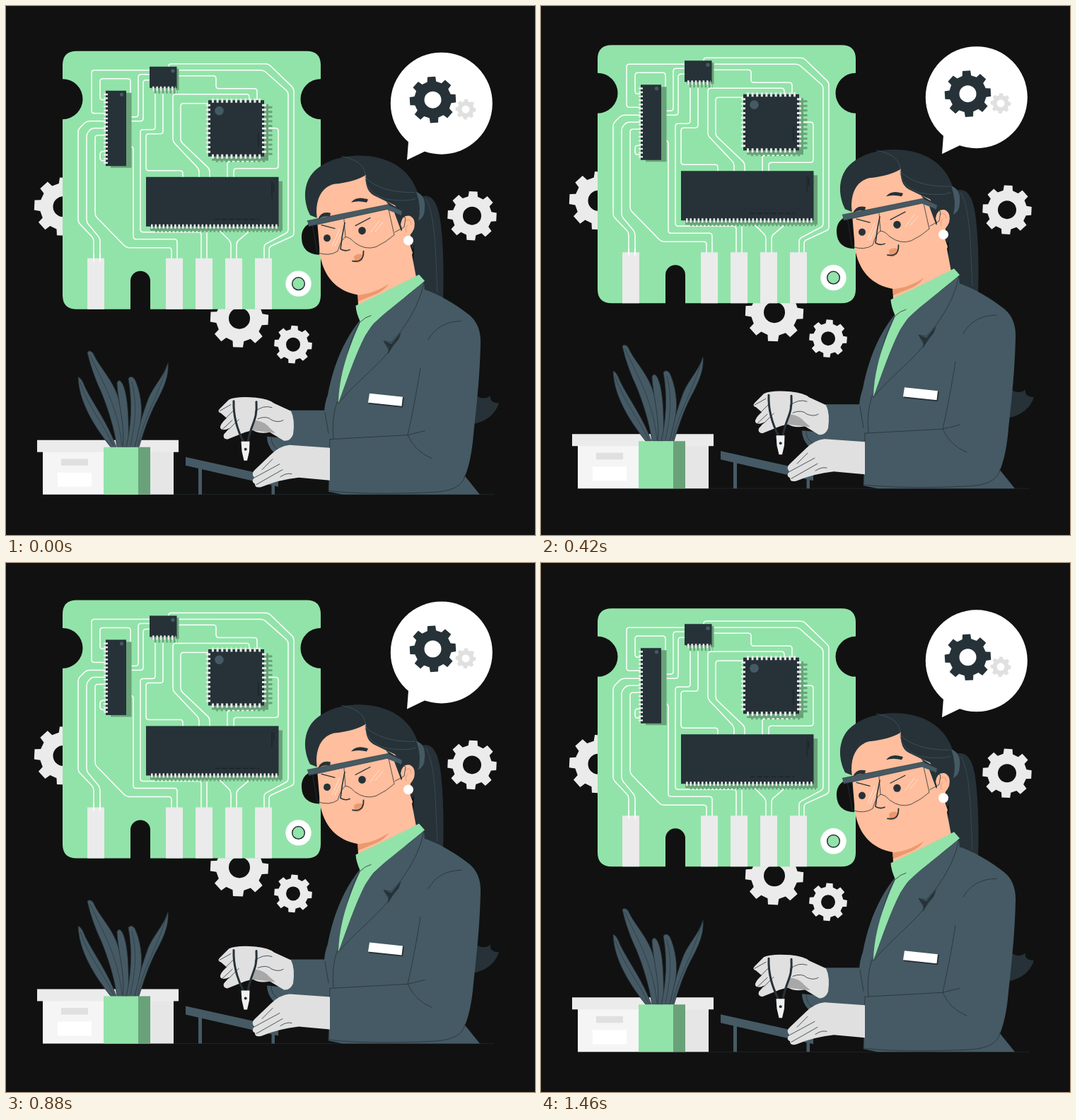
Write an HTML page that moves like this. It is 748 px wide and 748 px high and loops after 1500 ms.

```html
<!DOCTYPE html>
<html lang="en">
<head>
<meta charset="utf-8">
<title>Circuit technician</title>
<style>
  html, body { margin: 0; height: 100%; overflow: hidden; background: #111; }
  svg { display: block; width: 100vw; height: 100vh; }
  .slate { fill: #455a64; }
  .dark { fill: #263238; }
  .green { fill: #92e3a9; }
  .shade { fill: #69a279; }
  .pale { fill: #ebebeb; }
  .grey { fill: #e0e0e0; }
  .skin { fill: #ffbe9d; }
  .blush { fill: #eb996e; }
  .white { fill: #fff; }
  .line { fill: none; stroke: #263238; stroke-linecap: round; stroke-linejoin: round; }
  .trace { fill: none; stroke: #fff; stroke-width: 1.5; }
  .pins { fill: none; stroke: #ebebeb; stroke-width: 6; }
  .pinShade { fill: none; stroke: #69a279; stroke-width: 6; }
</style>
</head>
<body>
<svg viewBox="0 0 748 748">
<g id="scene">
  <path class="line" d="M52 691H690" stroke-width=".6"/>
  <g id="gears"></g>

  <!-- circuit board -->
  <path class="green" d="M100 64H425Q445 64 445 84V103.500A28.500 28.500 0 0 0 445 160.500V409Q445 429 425 429H204V389A14 14 0 0 0 176 389V429H100Q80 429 80 409V160.500A28.500 28.500 0 0 0 80 103.500V84Q80 64 100 64Z"/>
  <g id="traces">
    <polyline points="230,88 230,82 371,82 407,117 407,325 372,341 372,358"/>
    <polyline points="241,91 364,91 399,122 399,320 365,338 365,358"/>
    <polyline points="241,99 297,99 297,117 355,117 355,134"/>
    <polyline points="203,91 121,91 121,152 141,152"/>
    <polyline points="141,133 133,133 133,103 176,103 176,137 169,137"/>
    <polyline points="203,97 187,97 187,157 169,157"/>
    <polyline points="203,105 194,105 194,163 169,163"/>
    <polyline points="211,118 211,175 190,175 190,320 276,320 276,358"/>
    <polyline points="222,118 222,181 198,181 198,233 250,233 250,243"/>
    <polyline points="141,163 114,163 102,175 102,306 124,329 124,362"/>
    <polyline points="141,173 121,173 114,181 114,306 133,329 133,362"/>
    <polyline points="141,183 126,183 126,297 170,342 234,342 234,358"/>
    <polyline points="141,206 133,206 133,219 141,219"/>
    <polyline points="169,199 180,199 180,330 242,330 242,358"/>
    <polyline points="287,138 247,138 247,192 288,231 288,243"/>
    <polyline points="344,134 344,125 236,125 236,192 273,231 273,243"/>
    <polyline points="366,173 385,173 385,230 322,230 322,243"/>
    <polyline points="355,212 355,220 313,220 313,243"/>
    <polyline points="284,312 284,358"/>
    <polyline points="302,318 318,334 318,358"/>
    <polyline points="345,318 326,334 326,358"/>
  </g>
  <path class="pale" d="M115 357h24v72h-24zM226 357h24v72h-24zM268 357h24v72h-24zM310 357h24v72h-24zM352 357h24v72h-24z"/>
  <path class="trace" d="M124 350V362M133 350V362"/>
  <circle class="white" cx="413.500" cy="393" r="18.200"/>
  <circle class="green" cx="413.500" cy="393" r="8.800" stroke="#263238" stroke-width="1.500"/>

  <!-- chips -->
  <path class="shade" d="M204 248H391V318H204zM291 139H371V219H291zM206 89H244.500V119H206zM148 123H177.500V229H148z"/>
  <path class="pinShade" d="M211 317H389" stroke-dasharray="2.600 2.900"/>
  <path class="pinShade" d="M373.500 142V212M297 218H368" stroke-dasharray="3 3.600"/>
  <path class="pinShade" d="M210 121H243" stroke-dasharray="2.500 2.900"/>
  <path class="dark" d="M198 242H385.500V312H198zM286 133.500H365V213H286zM203 86H241.500V116H203zM141 120H170V226.500H141z"/>
  <path class="pins" d="M205 312H384" stroke-dasharray="2.600 2.900"/>
  <path class="pins" d="M291 134H363M291 213H363M286 139V210M365 139V210" stroke-dasharray="3 3.600"/>
  <path class="pins" d="M207 117H240" stroke-dasharray="2.500 2.900"/>
  <path class="pins" d="M141 124V224" stroke-dasharray="2.500 3.200"/>
  <path class="line" d="M376 250V272M378.500 252V262M357 180V200" style="stroke:#111" stroke-width=".6"/>
  <path class="line" d="M296 302H358" style="stroke:#111" stroke-width=".6" stroke-dasharray="6 4"/>
  <g class="slate">
    <circle cx="301.500" cy="148.500" r="6.300"/>
    <circle cx="236" cy="92" r="2.700"/>
    <circle cx="163.500" cy="125.500" r="2.600"/>
  </g>

  <!-- speech bubble -->
  <path class="white" d="M569 192L567 218L594 205Z"/>
  <circle class="white" cx="615.800" cy="138" r="72"/>
  <g id="thought"></g>

  <!-- storage box and plant -->
  <path fill="#f5f5f5" d="M52 630H140V691H52z"/>
  <path fill="#e6e6e6" d="M140 630H237V691H140z"/>
  <path class="pale" d="M44 614H244V631H44z"/>
  <path class="grey" d="M78 640.500H116V650H78z"/>
  <path class="white" d="M73 660H121V680H73z"/>
  <path class="white" d="M178 624L183 614L187 624Z"/>
  <g class="slate" stroke="#263238" stroke-width=".8">
    <path d="M102 525C106 526 109 532 112 540C125 566 145 592 156 624H148C125 595 103 560 102 525Z"/>
    <path d="M229 505C231 526 220 546 211 563C200 585 194 605 188 624H181C187 598 193 578 201 556C209 537 222 526 229 505Z"/>
    <path d="M115 490Q118 486 123 491C132 512 153 530 160 559C167 585 170 606 171 624H157C153 597 144 569 135 547Q122 520 115 490Z"/>
    <path d="M157 533Q160 526 165 535C173 552 174 590 173 624H165C169 595 158 560 157 533Z"/>
    <path d="M173 527Q177 522 182 528C190 545 194 570 190 590Q186 608 182 624H170C177 594 179 560 173 527Z"/>
  </g>
  <path class="line" d="M119 494C136 532 158 565 164 622M105 533C115 565 140 595 152 622M227 511C216 550 196 580 186 622M178 532C187 568 181 597 176 622" stroke-width=".6"/>
  <path class="green" d="M138 624H187V691H138z"/>
  <path class="shade" d="M187 624H204V691H187z"/>

  <!-- work stand -->
  <path class="slate" d="M272 650H277V691H272zM375.500 660H380V691H375.500zM254 638L385 667V680L254 650Z"/>

  <!-- ponytail -->
  <path class="dark" d="M586 270C603 264 612 280 615 310Q620 355 618 418L575 400L578 300Z"/>
  <path class="dark" d="M660 548Q675 560 685 551Q683 561 697 562Q689 585 662 591Z"/>
  <path class="line" d="M594 273C608 300 607 350 610 405" style="stroke:#455a64" stroke-width=".6"/>

  <!-- far arm -->
  <path class="slate" d="M402 572H460V628L400 622L378 631Q369 621 369 609L402 612Z"/>
  <path class="line" d="M375 610Q375 622 385 628" stroke-width=".8"/>
  <path class="grey" d="M315 557Q325 552 353 554Q372 556 379 562L403 573Q409 585 406 606Q402 616 393 615L373 603Q358 606 349 600L338 603L313 613Q306 612 308 606L316 597Q306 602 303 597Q302 592 312 583L304 576Q298 574 302 570Z"/>
  <path d="M353 586Q366 588 373 597L381 604L371 603L346 600Z" fill="#a8a8a8"/>
  <path class="grey" d="M352 574Q367 562 379 567L390 588Q382 591 373 585L358 583Z"/>
  <path class="line" d="M302 573L318 564M309 585L321 573M315 599L329 585M352 574Q363 564 376 568M356 584Q369 579 376 586Q386 590 392 586M305 600L320 586" stroke-width=".8"/>
  <path class="line" d="M322 559Q321 588 336 617M354 560C356 587 346 591 342 617" stroke-width="3"/>
  <path fill="#f0f0f0" d="M332.500 616H344.500L344 630L341 643H336.500L333.500 630Z"/>
  <circle class="dark" cx="338.700" cy="627" r="2"/>

  <!-- jacket -->
  <path class="slate" d="M588 400C612 407 637 423 655 437Q672 451 671 478C670 525 665 570 661 606Q658 643 649 665L670 691H476L456 687L458 612L451 582Q448 570 455 550C463 507 479 470 502 443Z"/>
  <path class="line" d="M458 613L568 607L592 601M586 512C580 550 575 575 568 607Q578 630 602 640M644 446Q612 446 597 472M457 686Q515 692 600 688Q645 687 649 664M500 448C482 479 478 516 470 562M458 613L456 686M468 560Q460 585 463 612M451 575L456 605" stroke-width=".8"/>
  <path class="skin" d="M497 395L571 336L580 384L498 424Z"/>
  <path class="blush" d="M497 408C519 404 539 393 546 383Q541 401 520 409L498 418Z"/>
  <path class="green" d="M584 380L592 389C563 414 530 437 517 453L508 466C493 495 480 535 470 562C471 520 485 483 501 447Q495 434 494.500 424Q537 404 584 380Z"/>
  <path class="slate" d="M591 390L592 404Q582 430 558 461L544 473L555 476L541 490L470 562C488 513 504 467 520 449Q550 424 591 390Z"/>
  <path class="line" d="M591 391Q585 424 558 461L545 476L534 474L542 488C520 515 492 535 470 562M558 463L555 471L542 488M501 447Q508 440 516 438" stroke-width=".8"/>
  <path class="dark" d="M558 462L545 478L534 474L541 484L540 493L548 479L555 471Z"/>
  <path class="dark" d="M515 550L563 554L561 568L513 563Z"/>
  <path class="white" d="M514 548L561 553L559.500 566L512 561Z"/>

  <!-- near glove -->
  <path class="grey" d="M458 625V671L414 667Q386 670 362 680Q352 683 352 676Q346 673 351 667Q346 661 352 656L374 635Q387 622 401 621Z"/>
  <path class="line" d="M350 668L387 648M354 677L391 656M377 641L362 656M388 666Q397 660 404 662" stroke-width=".8"/>

  <!-- head -->
  <path class="dark" d="M430 296C420 277 420 252 434 236C450 219 477 211 504 212C549 214 573 237 582 264Q591 280 584 310L575 345L560 315L440 300Z"/>
  <path fill="#111" d="M430 307Q417 314 418 329Q419 351 443 352L446 308Z"/>
  <path class="skin" d="M439 292C439 270 448 256 464 252Q494 249 509 239Q507 261 520 268Q536 276 550 282L561 302Q568 293 576 302Q579 315 572 323L571 338L575 349C568 376 537 405 499 409C467 404 449 382 444 352Z"/>
  <path class="dark" d="M537 276L559 289L557 296Q564 294 566 300L559 319L549 292Z"/>
  <path class="skin" d="M558 309Q560 295 571 297Q580 301 577 315Q572 327 563 326Z"/>
  <path class="line" d="M565 304Q573 299 573 309M568 310Q564 314 566 320" style="stroke:#eb996e"/>
  <path class="slate" d="M580 263Q594 268 592 287Q592 299 583 304Q588 285 580 263Z"/>
  <path class="line" d="M475 213Q510 220 508 243Q531 265 578 264M508 245Q510 264 535 273Q565 278 579 273" style="stroke:#455a64" stroke-width=".7"/>
  <path class="dark" d="M441 302Q445 290 459 293L458 298Q448 297 441 302ZM488 278Q496 268 512 274L510 278Q498 275 488 278Z"/>
  <g class="dark">
    <ellipse cx="454" cy="328.500" rx="5" ry="5.200"/>
    <ellipse cx="503.500" cy="318" rx="5.300" ry="5.500"/>
  </g>
  <path class="line" d="M446 310L465 315M494 311L515 300" stroke-width="1.200"/>
  <path class="line" d="M479 307Q475 325 473 344Q479 348 486 345" stroke-width="1.600"/>
  <path class="blush" d="M492 354Q499 349 505 353L504 359Q498 366 493 362Z"/>
  <path class="line" d="M490 361Q506 364 505.500 347" stroke-width="1.800"/>
  <path class="line" d="M433 308L440 349Q457 355 469 347Q474 330 480 327Q486 327 493 335Q508 346 523 341Q538 334 549 324L541 288M545 287L565 300L563 313L550 320M478 302L480 327" stroke-width=".8"/>
  <path class="line" d="M461 340L472 315M465 340L474 321M515 321L528 304M522 319L533 306" style="stroke:#fff" stroke-width=".8" opacity=".7"/>
  <path class="slate" d="M426 304L540 281L560 290L559 296L538 288L428 312Z"/>
  <path class="line" d="M426 304L540 281L560 290M428 312L538 288" stroke-width=".6"/>
  <circle class="white" cx="569" cy="332" r="7"/>
</g>
</svg>
<script>
  const byId = id => document.getElementById(id);
  const scene = byId('scene');

  function addPath(parent, className, d) {
    const path = document.createElementNS('http://www.w3.org/2000/svg', 'path');
    path.setAttribute('class', className);
    path.setAttribute('d', d);
    path.setAttribute('fill-rule', 'evenodd');
    parent.append(path);
  }

  // Eight trapezoid teeth around a ring with a round hole.
  function gear(parent, className, x, y, radius, hole, turn) {
    const points = [];
    for (let i = 0; i < 8; i++) {
      for (const [offset, scale] of [[-.24, .8], [-.17, 1], [.17, 1], [.24, .8]]) {
        const angle = i * Math.PI / 4 + turn + offset;
        points.push([x + radius * scale * Math.cos(angle), y + radius * scale * Math.sin(angle)]);
      }
    }
    addPath(parent, className, `M${points.join('L')}ZM${x - hole} ${y}a${hole} ${hole} 0 1 0 ${2 * hole} 0a${hole} ${hole} 0 1 0 ${-2 * hole} 0Z`);
  }

  // Turn a polyline into a path with softened corners.
  function roundCorners(points, radius = 4) {
    const toward = (a, b) => {
      const k = Math.min(.5, radius / Math.hypot(b.x - a.x, b.y - a.y));
      return `${a.x + (b.x - a.x) * k} ${a.y + (b.y - a.y) * k}`;
    };
    const last = points.length - 1;
    let d = `M${points[0].x} ${points[0].y}`;
    for (let i = 1; i < last; i++) {
      const p = points[i];
      d += `L${toward(p, points[i - 1])}Q${p.x} ${p.y} ${toward(p, points[i + 1])}`;
    }
    return `${d}L${points[last].x} ${points[last].y}`;
  }

  const gears = byId('gears'), thought = byId('thought');
  gear(gears, 'pale', 81, 284, 41.5, 14.5, .05);
  gear(gears, 'pale', 330, 442, 41.5, 15, .05);
  gear(gears, 'pale', 406, 479, 27, 10, .08);
  gear(gears, 'pale', 659, 297, 35, 13, .05);
  gear(thought, 'dark', 603.5, 133, 33, 12, -.06);
  gear(thought, 'grey', 650, 146.5, 14.5, 5.5, .05);

  const traces = byId('traces');
  for (const line of [...traces.children]) {
    addPath(traces, 'trace', roundCorners([...line.points]));
    line.remove();
  }

  // The whole scene rises and sinks linearly at 24 steps per second.
  const LOOP = 1500, STEPS = 36, LOW = .4, RISE = 15.3;
  function draw() {
    const time = performance.now() % LOOP;
    const step = Math.floor((time + 3) * STEPS / LOOP) + .9;
    const phase = (step / STEPS) % 1;
    const y = LOW - RISE * (1 - Math.abs(1 - 2 * phase));
    scene.setAttribute('transform', `translate(0 ${y})`);
    requestAnimationFrame(draw);
  }
  draw();
</script>
</body>
</html>
```
